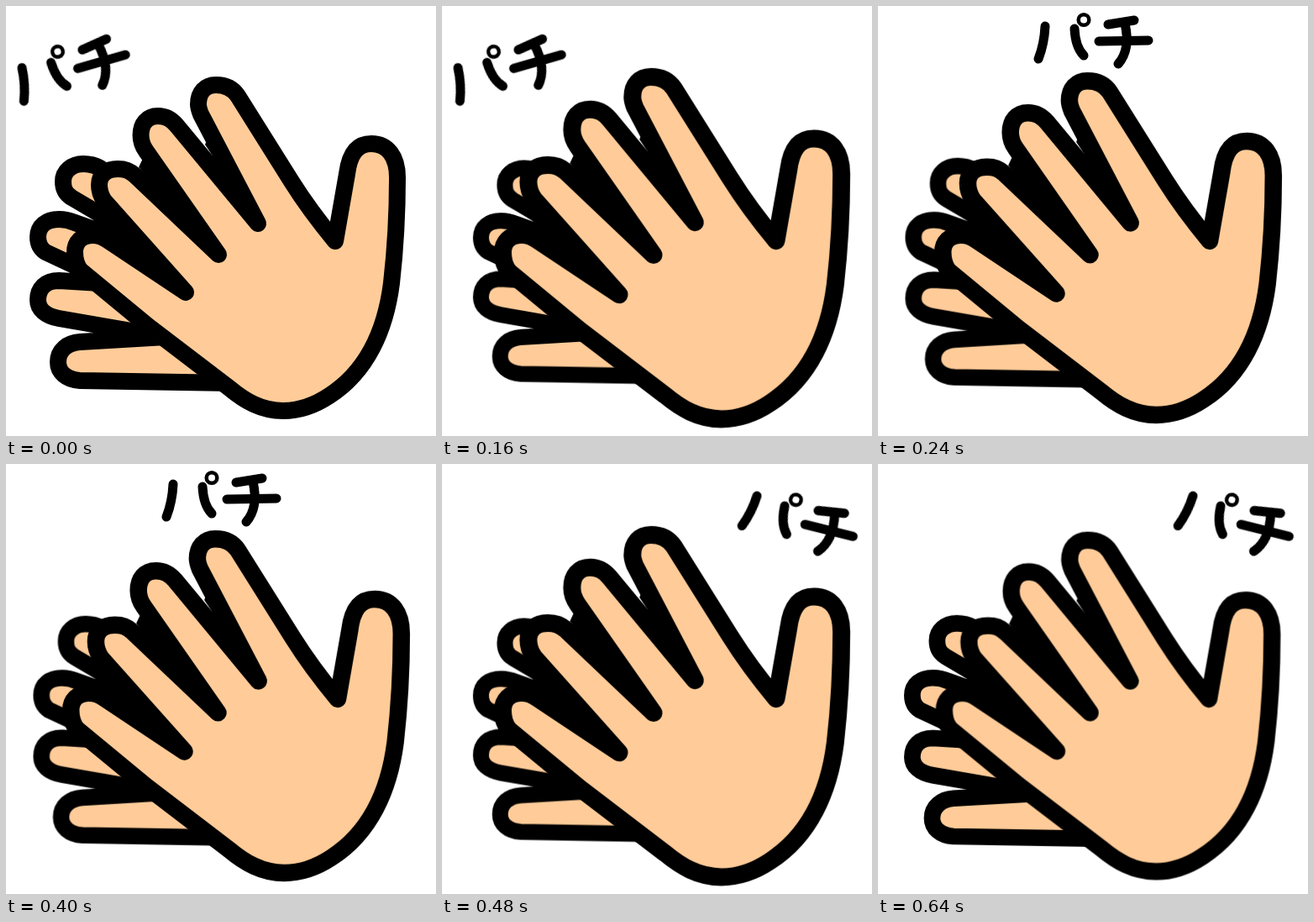
Write an HTML page that moves like this. It is 512 px wide and 512 px high and loops after 720 ms.

```html
<!DOCTYPE html>
<html lang="ja">
<head>
<meta charset="utf-8">
<title>Clapping hands</title>
<style>
  html, body {
    margin: 0;
    width: 100%;
    height: 100%;
    overflow: hidden;
    background: #fff;
  }
  svg { display: block; width: 100%; height: 100%; }

  .hand {
    fill: #fc9;
    stroke: #000;
    stroke-width: 20;
    stroke-linecap: round;
    stroke-linejoin: round;
    animation: clap 720ms infinite;
  }
  .front { --peak: 1.05; transform-origin: 275px 287px; }
  .back { --peak: .95; transform-origin: 205px 287px; }
  .gap { fill: #000; stroke: none; }

  .word {
    fill: none;
    stroke: #000;
    stroke-width: 11;
    stroke-linecap: round;
    stroke-linejoin: round;
    animation: hop 720ms step-end infinite;
  }
  .ring { stroke-width: 4.5; }

  /* Two even beats, then a slower return */
  @keyframes clap {
    0%      { transform: scale(1); animation-timing-function: steps(2); }
    22.222% { transform: scale(var(--peak)); animation-timing-function: steps(2); }
    44.444% { transform: scale(1); animation-timing-function: steps(2); }
    66.666% { transform: scale(var(--peak)); animation-timing-function: steps(3); }
    100%    { transform: scale(1); }
  }
  @keyframes hop {
    0%      { transform: translate(19px, 73.5px) rotate(-15deg); }
    33.333% { transform: translate(199px, 24px) rotate(0deg); }
    66.666% { transform: translate(375px, 38px) rotate(15deg); }
    100%    { transform: translate(375px, 38px) rotate(15deg); }
  }
</style>
</head>
<body>
<svg viewBox="0 0 512 512" role="img" aria-label="パチパチ">
  <g class="hand back">
    <path d="M200 300 L78 228 C70 223 68 217 68 209 C68 197 78 188 92 188
             C100 188 105 189 112 193 L220 265
             L300 350 L270 449 L88 446 C72 445 62 436 62 424
             C62 410 73 401 88 400 L190 394 L63 372 C47 369 38 361 38 350
             C38 336 47 327 63 327 L112 330 L190 360 L47 293
             C41 289 38 283 38 275 C38 262 48 254 63 254
             C70 254 75 255 82 258 Z"/>
  </g>

  <g class="hand front">
    <path class="gap" d="M158 192 L167 173 L253 296 Z M118 277 L114 230 L214 341 Z M237 165 L243 150 L300 259 Z"/>
    <path d="M300 259 L232 129 C230 124 229 121 229 117
             C229 103 237 94 250 94 C262 94 270 98 276 107
             L340 209 Q362 244 392 280
             L406 200 C409 176 418 164 435 164 C455 164 466 180 466 204
             C466 245 463 295 459 330 C452 385 430 435 385 464
             C367 476 350 482 330 482 C304 482 284 470 266 455
             L169 381 L89 315 C84 309 82 301 82 293
             C82 281 90 273 103 273 C111 273 115 275 121 279
             L214 341 L117 232 C113 226 111 220 111 213
             C111 201 120 194 133 194 C142 194 147 196 154 202
             L253 296 L167 173 C162 166 160.500 161 160.500 154
             C160.500 140 168 131 181 131 C191 131 197 135 203 142 Z"/>
  </g>

  <g class="word">
    <path d="M0 0 Q-1 21 -8 39"/>
    <path d="M35 3 Q36 25 46 35"/>
    <circle class="ring" cx="46" cy="-7.500" r="6.300"/>
    <path d="M75 -2 L106 -7"/>
    <path d="M64 18 L123 17"/>
    <path d="M95 -3 Q102 28 87 45"/>
  </g>
</svg>
</body>
</html>
```
